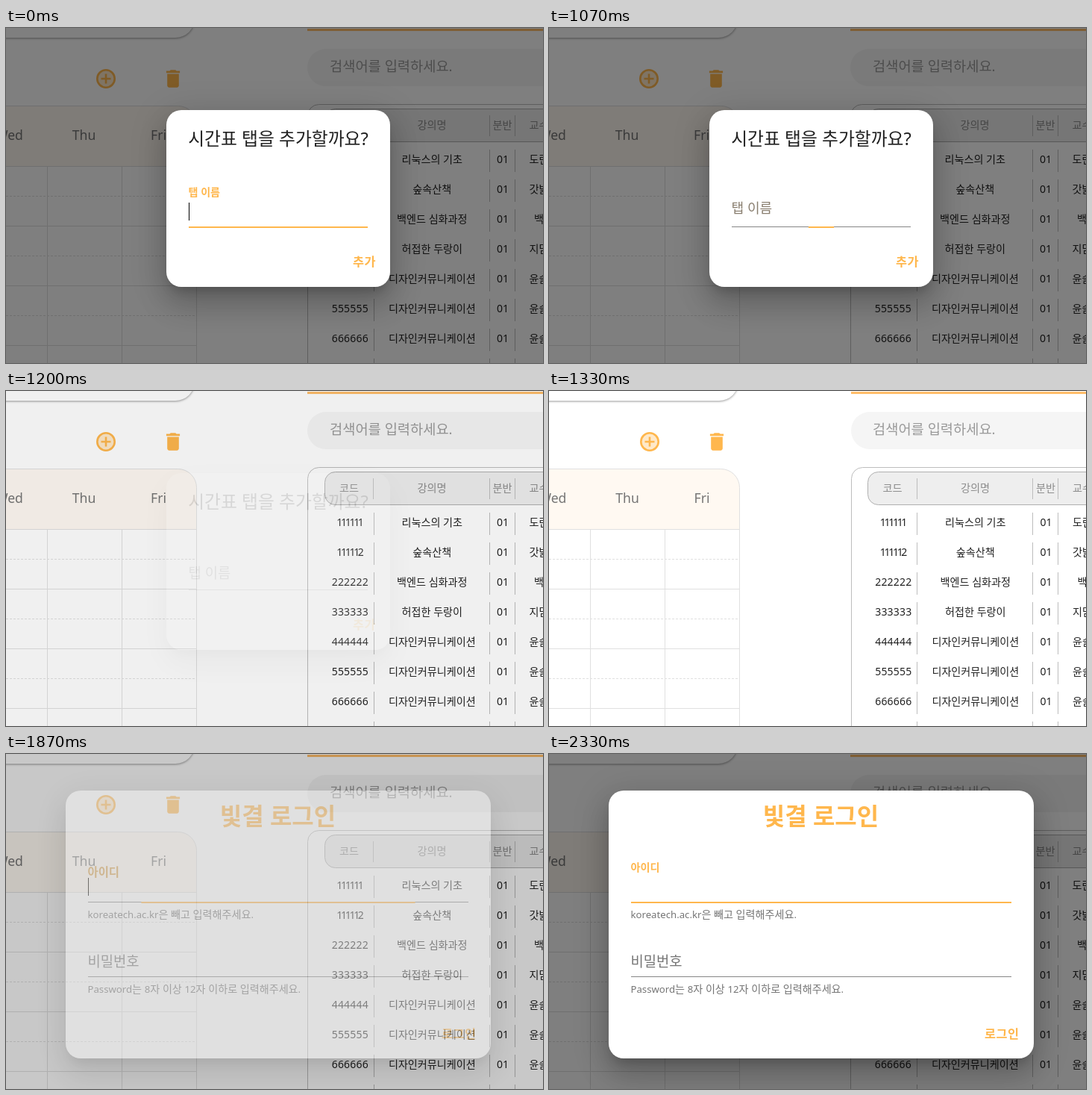
An HTML page that plays this animation: 720 by 449 pixels, repeating every 2.59 s.

```html
<!DOCTYPE html>
<html lang="ko">
<head>
<meta charset="utf-8">
<title>시간표</title>
<style>
  html, body { margin: 0; width: 100%; height: 100%; overflow: hidden; background: #fff; }
  body { position: relative; font-family: 'Noto Sans', 'Noto Sans CJK KR', 'Noto Sans CJK JP', sans-serif; }
  svg, .layer { position: absolute; left: 0; top: 0; width: 720px; height: 449px; }
  .layer { overflow: hidden; }
  #backdrop { background: #000; }
  .paper {
    position: absolute; border-radius: 20px; background: #fff;
    box-shadow: 0 11px 15px -7px rgba(0,0,0,.2), 0 24px 38px 3px rgba(0,0,0,.14), 0 9px 46px 8px rgba(0,0,0,.12);
  }
  .latin { font-size: .935em; }
  .button { font-weight: 700; letter-spacing: .02857em; }
</style>
</head>
<body>
<svg id="page" viewBox="0 0 720 449"></svg>
<div id="backdrop" class="layer"></div>
<div id="tab" class="layer"></div>
<div id="login" class="layer"></div>
<script>
const LOOP = 2590, STEP = 1000 / 15;
const ORANGE = '#ffb74d', INK = '#212121', GRAY = '#757575', LINE = '#e0e0e0', RULE = '#bdbdbd', UNDER = '#868686';
const $ = id => document.getElementById(id);

// markup helpers
const text = (x, y, size, fill, str, more = '') =>
  `<text x="${x}" y="${y}" font-size="${size}" fill="${fill}" ${more}>${str}</text>`;
const mid = (x, y, size, fill, str, more = '') =>
  text(x, y, size, fill, str, 'text-anchor="middle" ' + more);
const path = (d, stroke, more = '') => `<path d="${d}" fill="none" stroke="${stroke}" ${more}/>`;
const rect = (x, y, w, h, fill, more = '') =>
  `<rect x="${x}" y="${y}" width="${w}" height="${h}" fill="${fill}" ${more}/>`;
const mixed = str => str.replace(/[A-Za-z0-9.]+/g, '<tspan class="latin">$&</tspan>');

function calendar() {
  let out = `<path d="M-5 104.5H230.5a25 25 0 0 1 25 25V185.5H-5z" fill="#fff9f2" stroke="${LINE}"/>`;
  for (let y = 185.5; y < 449; y += 80) {
    out += path(`M0 ${y}H255`, LINE);
    if (y < 400) out += path(`M0 ${y + 40}H255`, LINE, 'stroke-dasharray="3 2"');
  }
  return out + path('M55.5 185V449M155.5 185V449M255.5 185V449', LINE);
}

function icons() {
  return `<g transform="translate(134 68) scale(1.3)" stroke="${ORANGE}" stroke-width="2">
      <circle r="9" fill="${ORANGE}" fill-opacity=".3"/><path d="M-5 0H5M0-5V5"/></g>
    <path transform="translate(224 68) scale(1.3) translate(-12 -12)" fill="${ORANGE}"
      d="M6 19c0 1.1.9 2 2 2h8c1.1 0 2-.9 2-2V7H6zM19 4h-3.5l-1-1h-5l-1 1H5v2h14z"/>`;
}

const rows = [
  ['111111', '리눅스의 기초', '도란솔'],
  ['111112', '숲속산책', '갓밝음'],
  ['222222', '백엔드 심화과정', '백솔'],
  ['333333', '허접한 두랑이', '지담결'],
  ['444444', '디자인커뮤니케이션', '윤슬봄'],
  ['555555', '디자인커뮤니케이션', '윤슬봄'],
  ['666666', '디자인커뮤니케이션', '윤슬봄']
];

function tableText() {
  let out = mid(460, 134.5, 14.2, '#8c8c8c', '코드') + mid(571, 134.5, 14.2, '#8c8c8c', '강의명') +
    mid(665.5, 134.5, 14.2, '#8c8c8c', '분반') + text(701.5, 134.5, 14.2, '#8c8c8c', '교수');
  rows.forEach(([code, name, prof], i) => {
    const y = 181.3 + i * 40;
    out += code[0] === '1'
      ? text(443.3, y, 14, INK, code, 'letter-spacing="-2.3"')
      : mid(461.3, y, 14, INK, code, 'letter-spacing=".2"');
    out += mid(571.3, y, 14.1, INK, name) + text(658, y, 14, INK, '01') +
      text(prof.length < 3 ? 708 : 701.5, y, 14.1, INK, prof);
  });
  return out;
}

function rules() {
  let d = 'M648.5 117V145M682.5 117V145';
  for (let y = 163; y < 449; y += 40)
    for (const x of [493.5, 648.5, 682.5]) d += `M${x} ${y}v30`;
  return path(d, RULE);
}

$('page').innerHTML = calendar() +
  `<g class="edge">
    ${rect(-60, -60, 313, 73, '#fff', 'rx="26" style="filter:drop-shadow(0 1px 1.5px rgba(0,0,0,.4))"')}
    ${rect(404, 1, 330, 3, '#ffbd69')}
    ${rect(404, 28, 400, 50, '#f5f5f5', 'rx="25"')}
    ${icons()}
    ${rect(404.5, 102.5, 400, 400, '#fff', `rx="15" stroke="${RULE}"`)}
  </g>` +
  rect(427.5, 108.5, 400, 44, '#eee', 'rx="14" stroke="#b0b0b0"') + rules() +
  `<g class="edge">${path('M492.5 117V145', RULE)}</g>` +
  text(434, 57.5, 18.7, '#9a9a9a', '검색어를 입력하세요.') +
  `<g class="words">${['Wed', 'Thu', 'Fri'].map((d, i) =>
    mid(4.5 + i * 100, 150, 17.6, GRAY, d)).join('')}${tableText()}</g>`;

// text field whose label shrinks and whose underline grows on focus
const field = (x, y, w, label) =>
  `<text class="label" font-size="18.8">${label}</text>` +
  rect(x, y, w, 1, UNDER) + rect(x, y, w, 2, ORANGE, 'class="bar"') +
  rect(x, y - 32, 1, 24, '#000', 'class="caret"');

function dialog(id, [left, top, w, h], [x, y, fw, label], body) {
  const el = $(id);
  el.innerHTML = `<div class="paper" style="left:${left}px;top:${top}px;width:${w}px;height:${h}px"></div>
    <svg viewBox="0 0 720 449">${body}${field(x, y, fw, label)}</svg>`;
  const [lab, bar, caret] = ['.label', '.bar', '.caret'].map(s => el.querySelector(s));
  return (opacity, focus, caretOn) => {
    el.style.opacity = opacity;
    el.style.visibility = opacity > 0 ? 'visible' : 'hidden';
    lab.setAttribute('transform', `translate(${x - .5} ${y - 14.5 - 27 * focus}) scale(${1 - .25 * focus})`);
    lab.setAttribute('fill', mix([117, 117, 117], [255, 183, 77], focus));
    lab.setAttribute('font-weight', focus > .5 ? 700 : 400);
    bar.setAttribute('x', x + fw * (1 - focus) / 2);
    bar.setAttribute('width', fw * focus);
    caret.setAttribute('opacity', caretOn ? 1 : 0);
  };
}

const drawTab = dialog('tab', [215, 110, 300, 237], [245, 266, 240, '탭 이름'],
  mid(365, 156.8, 23.8, INK, '시간표 탭을 추가할까요?') +
  text(465, 318.5, 16.33, ORANGE, '추가', 'class="button"'));

const drawLogin = dialog('login', [80, 49, 570, 359], [110, 198, 510, '아이디'],
  mid(364.5, 95, 32, ORANGE, '빛결 로그인', 'font-weight="700"') +
  text(109.5, 219.7, 14.1, GRAY, mixed('koreatech.ac.kr은 빼고 입력해주세요.')) +
  text(109.5, 284.5, 18.8, GRAY, '비밀번호') + rect(110, 298, 510, 1, UNDER) +
  text(109.5, 319.7, 14.1, GRAY, mixed('Password는 8자 이상 12자 이하로 입력해주세요.')) +
  text(584, 380.5, 16.33, ORANGE, '로그인', 'class="button"'));

// timing
const mix = (a, b, k) => `rgb(${a.map((v, i) => Math.round(v + (b[i] - v) * k)).join()})`;
const bezier = (x1, y1, x2, y2) => x => {
  if (x <= 0 || x >= 1) return x <= 0 ? 0 : 1;
  const at = (a, b, s) => 3 * (1 - s) * (1 - s) * s * a + 3 * (1 - s) * s * s * b + s * s * s;
  let lo = 0, hi = 1;
  for (let i = 0; i < 24; i++) {
    const s = (lo + hi) / 2;
    if (at(x1, x2, s) < x) lo = s; else hi = s;
  }
  return at(y1, y2, lo);
};
const standard = bezier(.4, 0, .2, 1), easeOut = bezier(0, 0, .2, 1);

function draw(time) {
  // the picture advances at 15 steps a second
  const t = Math.round(Math.floor((time + 4) / STEP) * STEP / 10) * 10;
  const tabShow = t < 1330 ? 1 - standard((t - 1081) / 195) : 0;
  const loginShow = standard((t - 1797) / 225);
  drawTab(tabShow, 1 - easeOut((t - 920) / 285), t < 70 || (t >= 600 && t < 930));
  drawLogin(loginShow, easeOut((t - 1797) / 200), t < 2330);
  $('backdrop').style.opacity = .5 * Math.max(tabShow, loginShow);
  // the page re-centres while no dialog locks its scrolling
  const shift = t >= 1330 && t < 1800 ? 1 : 0;
  document.querySelectorAll('.edge').forEach(g => g.setAttribute('transform', `translate(${shift})`));
  document.querySelector('.words').setAttribute('transform', `translate(${shift / 2})`);
}

const start = performance.now();
function tick() {
  draw((performance.now() - start) % LOOP);
  requestAnimationFrame(tick);
}
tick();
</script>
</body>
</html>
```
